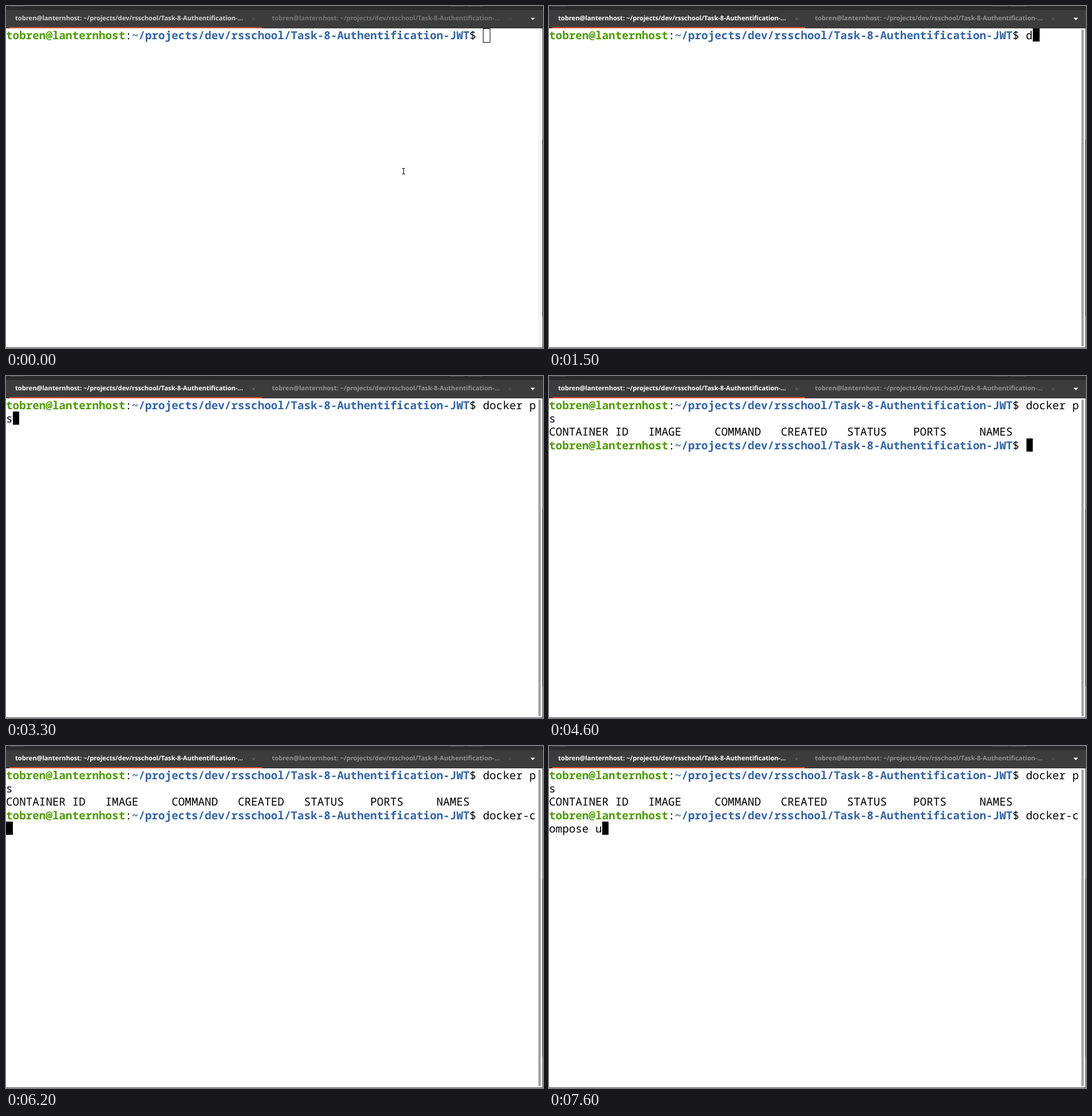
An HTML page for the animation above (8000 ms loop, 938 px wide and 597 px high).

```html
<!DOCTYPE html>
<html lang="en">
<head>
<meta charset="utf-8">
<title>Terminal</title>
<style>
  html, body { margin: 0; width: 100%; height: 100%; overflow: hidden; }
  body { position: relative; background: #fff; text-rendering: geometricPrecision; }
  body * { position: absolute; box-sizing: border-box; }

  #top { left: 0; top: 0; width: 938px; height: 39px; background: #3c3c3c; border-top: 7px solid #2b2b2b; border-bottom: 1px solid #343434; }
  #top i { top: -7px; height: 1px; background: #484848; }
  #line { left: 6px; top: 30px; width: 441px; height: 2px; background: #e95420; }
  .tab { top: 7px; font: bold 11.13px/16px "Open Sans", sans-serif; white-space: pre; color: #919191; }
  .tab.on { color: #fff; }
  #top svg { left: 0; top: -7px; }
  .close { stroke: #858585; }
  .close.dim { stroke: #606060; }
  .arrow { fill: #fff; }

  #term { left: 0; top: 39px; margin: 0; color: #000; font: 19.3px/23.2px "Noto Sans Mono", monospace; }
  #term span { position: static; }
  .user { color: #4e9a06; font-weight: bold; }
  .path { color: #3465a4; font-weight: bold; }
  #cursor { width: 11.6px; height: 23px; background: #000; }

  #gutter { left: 929px; top: 39px; width: 8px; height: 557px; background: #f5f5f5; }
  #thumb { left: 930px; top: 41px; width: 4px; height: 553px; border-radius: 2px; background: #a3a3a3; }
  #right { left: 937px; top: 39px; width: 1px; height: 558px; background: linear-gradient(#4a4a4a 194px, #0c0c0c 0 503px, #4a4a4a 0); }
  #bottom { left: 0; top: 596px; width: 938px; height: 1px; background: #4a4a4a; }
  #mouse { left: 690px; top: 280px; }

  .idle .tab { color: #757575; }
  .idle .tab.on { color: #d3d3d3; }
  .idle .close { stroke: #5c5c5c; }
  .idle .close.dim { stroke: #4a4a4a; }
  .idle .arrow { fill: #cfcfcf; }
  .idle #line { background: #dc5523; }
  .idle #thumb { display: none; }
  .idle #cursor { width: 13px; height: 25px; margin: 0 0 0 -1px; background: none; border: 1px solid #000; }
</style>
</head>
<body class="idle">
<div id="top">
  <i style="left:6px;width:25px"></i>
  <i style="left:775px;width:26px"></i>
  <i style="left:807px;width:26px"></i>
  <div class="tab on" style="left:16px"></div>
  <div class="tab" style="left:464.5px"></div>
  <div id="line"></div>
  <svg width="938" height="38">
    <path class="close" d="M430.5 20.5l4 4m0-4l-4 4"/>
    <path class="close dim" d="M878.5 20.5l4 4m0-4l-4 4"/>
    <path class="arrow" d="M916 20.5h8.4l-4.2 4.2z"/>
  </svg>
</div>
<div id="gutter"></div>
<div id="thumb"></div>
<pre id="term"><span class="prompt"></span><span id="first"></span><span id="output">
CONTAINER ID   IMAGE     COMMAND   CREATED   STATUS    PORTS     NAMES
<span class="prompt"></span><span id="second"></span></span></pre>
<div id="cursor"></div>
<svg id="mouse" width="10" height="17" fill="none">
  <path d="M2 3.5h1.5l1 1 1-1H7M2 13.5h1.5l1-1 1 1H7M4.5 4.5v8" stroke="#fff" stroke-width="2.5"/>
  <path d="M2 3.5h1.5l1 1 1-1H7M2 13.5h1.5l1-1 1 1H7M4.5 4.5v8" stroke="#111" stroke-width="1.2"/>
</svg>
<div id="right"></div>
<div id="bottom"></div>
<script>
const LOOP = 8000, COLS = 80, CELL = 11.58, ROW = 23.2, TOP = 39;
const FOCUS = 500, ENTER = 3500;
const USER = "tobren@lanternhost";
const DIR = "~/projects/dev/rsschool/Task-8-Authentification-";
const PROMPT = `${USER}:${DIR}JWT$ `.length;
const commands = [
  { id: "first", row: 0, text: "docker ps",
    keys: [1500, 1900, 2100, 2100, 2300, 2400, 2700, 2900, 3300] },
  { id: "second", row: 3, text: "docker-compose u",
    keys: [5100, 5200, 5400, 5500, 5600, 5700, 5900, 6200, 6300, 6500, 6800, 7000, 7100, 7300, 7400, 7600] }
];
const blinks = [[1100, 1500], [4000, 4600]];
const $ = id => document.getElementById(id);

for (const tab of document.querySelectorAll(".tab")) tab.textContent = `${USER}: ${DIR}...`;
for (const p of document.querySelectorAll(".prompt"))
  p.innerHTML = `<span class="user">${USER}</span>:<span class="path">${DIR}JWT</span>$ `;

function wrap(text) {
  const room = COLS - PROMPT;
  return text.length > room ? text.slice(0, room) + "\n" + text.slice(room) : text;
}

function draw(t) {
  document.body.className = t < FOCUS ? "idle" : "";
  $("mouse").style.display = t < commands[0].keys[0] ? "" : "none";
  $("output").style.display = t < ENTER ? "none" : "";

  for (const c of commands) {
    c.typed = c.keys.filter(k => k <= t).length;
    const shown = wrap(c.text.slice(0, c.typed));
    if ($(c.id).textContent !== shown) $(c.id).textContent = shown;
  }

  const active = commands[t < ENTER ? 0 : 1];
  const at = PROMPT + active.typed;
  const cursor = $("cursor").style;
  cursor.left = (at % COLS) * CELL + "px";
  cursor.top = Math.round(TOP + (active.row + Math.floor(at / COLS)) * ROW) + "px";
  cursor.visibility = blinks.some(([off, on]) => t >= off && t < on) ? "hidden" : "visible";
}

const start = performance.now();
function tick() {
  draw((performance.now() - start) % LOOP);
  requestAnimationFrame(tick);
}
tick();
</script>
</body>
</html>
```
